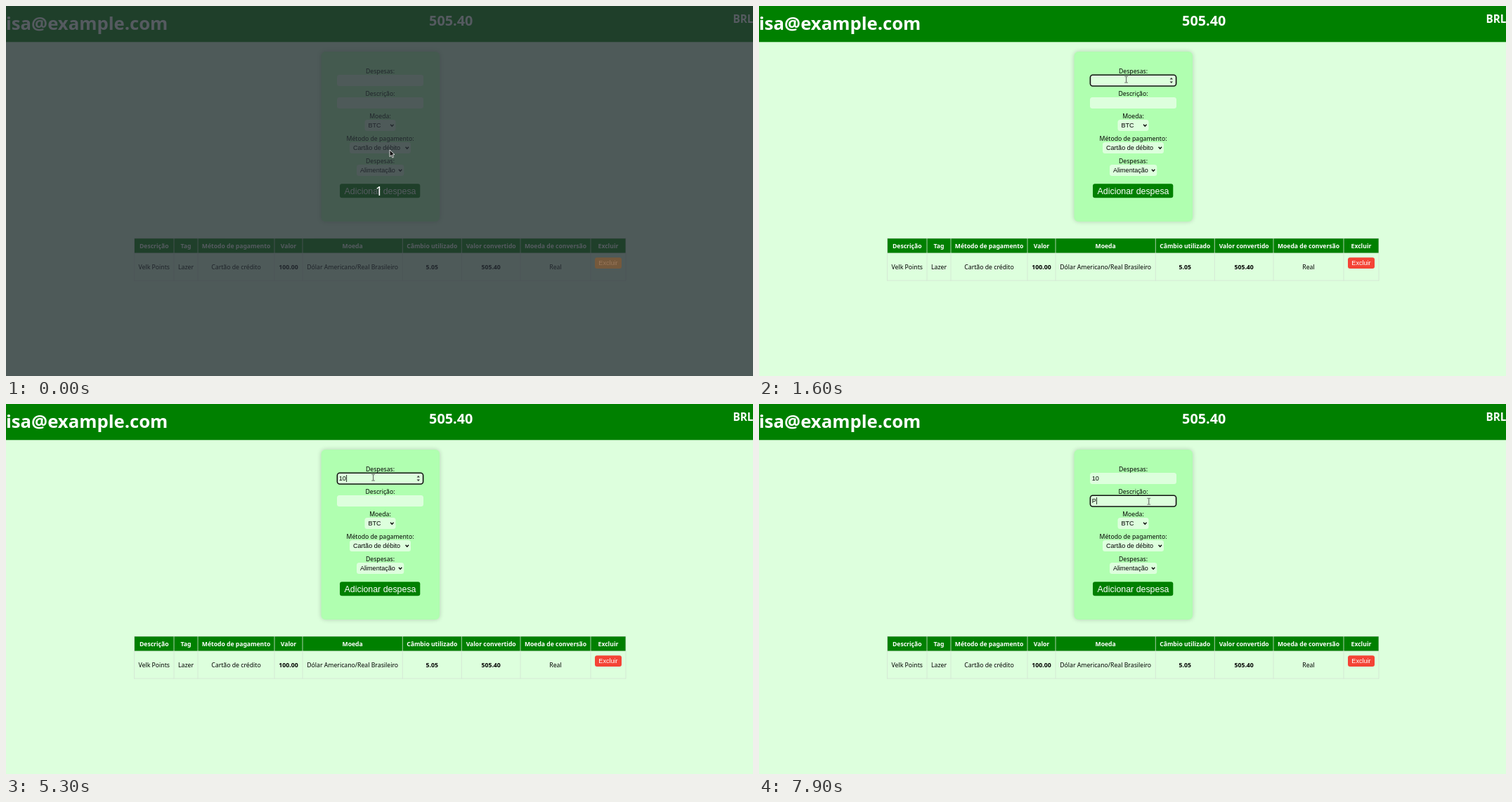
An HTML page with a canvas for the animation above (8000 ms loop, 1063 by 527 pixels).

```html
<!DOCTYPE html>
<html lang="pt-BR">
<head>
<meta charset="utf-8">
<title>Despesas</title>
<style>
  html, body { margin: 0; width: 100%; height: 100%; overflow: hidden; background: #ddffdd; }
  canvas { display: block; }
</style>
</head>
<body>
<canvas id="stage" width="1063" height="527"></canvas>
<script>
const ctx = document.getElementById('stage').getContext('2d');
const W = 1063, H = 527, LOOP = 8000;
const HUMAN = '"Noto Sans", "Open Sans", sans-serif';
const ARIAL = '"Liberation Sans", Arial, sans-serif';
const GREEN = '#008000', PAGE = '#ddffdd', CARD = '#b0ffb0';
const MID = 532.5;

function text(str, x, y, size, { color = '#000', family = HUMAN, weight = 400, align = 'center' } = {}) {
  ctx.font = `${weight} ${size}px ${family}`;
  ctx.fillStyle = color;
  ctx.textAlign = align;
  ctx.fillText(str, x, y);
}

function box(x, y, w, h, r, color) {
  ctx.beginPath();
  ctx.roundRect(x, y, w, h, r);
  ctx.fillStyle = color;
  ctx.fill();
}

function line(points, color, width) {
  ctx.beginPath();
  points.forEach(([x, y]) => ctx.lineTo(x, y));
  ctx.strokeStyle = color;
  ctx.lineWidth = width;
  ctx.stroke();
}

function triangle(x, y, dir) {
  ctx.beginPath();
  ctx.moveTo(x - 2.2, y);
  ctx.lineTo(x + 2.2, y);
  ctx.lineTo(x, y + 2.6 * dir);
  ctx.fillStyle = '#333';
  ctx.fill();
}

function header() {
  const bold = { color: '#fff', weight: 700 };
  ctx.fillStyle = GREEN;
  ctx.fillRect(0, 0, W, 51.3);
  text('isa@example.com', 0, 33.5, 25.7, { ...bold, align: 'left' });
  text('505.40', 633.2, 28, 19.8, bold);
  text('BRL', 1034.5, 24, 15.2, { ...bold, align: 'left' });
}

function select(label, x, y, w) {
  box(x, y, w, 16, 3.5, PAGE);
  text(label, x + 5, y + 11, 9.07, { family: ARIAL, align: 'left' });
  const ax = x + w - 5.2, ay = y + 6.8;
  line([[ax - 2.2, ay], [ax, ay + 2.4], [ax + 2.2, ay]], '#000', 1.3);
}

function input(y, value, focused, caret, spinner) {
  box(471, y, 123, 16, 3.5, PAGE);
  if (focused) {
    ctx.beginPath();
    ctx.roundRect(471.4, y + 0.2, 122.2, 15.8, 3.5);
    ctx.strokeStyle = '#101010';
    ctx.lineWidth = 1.6;
    ctx.stroke();
  }
  text(value, 473.8, y + 11, 9.07, { family: ARIAL, align: 'left' });
  if (caret) {
    const x = 474.2 + ctx.measureText(value).width;
    ctx.fillStyle = '#000';
    ctx.fillRect(x, y + 3, 0.8, 10);
  }
  if (spinner) {
    triangle(586.8, y + 6.6, -1);
    triangle(586.8, y + 9.4, 1);
  }
}

function form(s) {
  ctx.save();
  ctx.shadowColor = 'rgba(0,0,0,.2)';
  ctx.shadowBlur = 6;
  box(448.5, 65, 168.5, 242, 6, CARD);
  ctx.restore();

  ['Despesas:', 'Descrição:', 'Moeda:', 'Método de pagamento:', 'Despesas:']
    .forEach((label, i) => text(label, MID, 96.3 + i * 31.9, 8.69));

  input(98, s.amount, s.focus === 1, s.focus === 1 && s.caret, s.spinner);
  input(130, s.note, s.focus === 2, s.focus === 2 && s.caret, false);
  select('BTC', 510.5, 162, 44);
  select('Cartão de débito', 489, 194, 87);
  select('Alimentação', 499, 226, 67.3);

  box(475, 253.3, 114.3, 20, 3, GREEN);
  text('Adicionar despesa', MID, 267.5, 12.4, { color: '#fff', family: ARIAL });
}

const COLUMNS = [
  ['Descrição', 'Velk Points', 182.5],
  ['Tag', 'Lazer', 239],
  ['Método de pagamento', 'Cartão de crédito', 273],
  ['Valor', '100.00', 382],
  ['Moeda', 'Dólar Americano/Real Brasileiro', 422],
  ['Câmbio utilizado', '5.05', 564.3],
  ['Valor convertido', '505.40', 648.3],
  ['Moeda de conversão', 'Real', 732],
  ['Excluir', '', 832]
];
const RIGHT = 882;

function table() {
  ctx.fillStyle = GREEN;
  ctx.fillRect(182.5, 331, RIGHT - 182.5, 21);
  COLUMNS.forEach(([head, cell, x], i) => {
    const end = i < 8 ? COLUMNS[i + 1][2] : RIGHT;
    const mid = (x + end) / 2;
    text(head, mid, 344.8, 8.6, { color: '#fff', weight: 700 });
    text(cell, mid, 375.2, 8.7, { weight: /^\d/.test(cell) ? 700 : 400 });
    line([[x, 330.5], [x, 391.5]], '#d4e4d4', 0.8);
  });
  line([[RIGHT, 330.5], [RIGHT, 391.5]], '#d4e4d4', 0.8);
  [330.8, 352, 391].forEach(y => line([[182.5, y], [RIGHT, y]], '#d4e4d4', 0.8));
}

function deleteButton(color, label) {
  box(838, 358.3, 38, 15.8, 3, color);
  text('Excluir', 857, 369.3, 9.1, { color: label, family: ARIAL });
}

function arrow(x, y) {
  ctx.beginPath();
  [[0, 0], [0, 9.6], [2.3, 7.5], [3.9, 11], [5.5, 10.3], [3.9, 6.9], [7, 6.7]]
    .forEach(([dx, dy]) => ctx.lineTo(x + dx, y + dy));
  ctx.closePath();
  ctx.fillStyle = '#111';
  ctx.fill();
  ctx.strokeStyle = '#fff';
  ctx.lineWidth = 0.8;
  ctx.stroke();
}

function beam(x, y) {
  line([[x, y - 4.2], [x, y + 4.2]], '#555', 1);
  [-4.4, 4.4].forEach(dy => line([[x - 2.4, y + dy], [x + 2.4, y + dy]], '#666', 0.9));
}

const mix = (a, b, k) => a + (b - a) * k;
const span = (t, a, b) => Math.min(1, Math.max(0, (t - a) / (b - a)));

function pointer(t) {
  if (t < 100) return [546, 205];
  if (t < 1300) {
    const k = 1 - (1 - span(t, 100, 500)) ** 2;
    return [mix(545, 519.8, k), mix(157, 104.7, k)];
  }
  if (t < 5900) return [t < 1500 ? 521 : t < 1600 ? 522 : 522.6, 104.7];
  const k = span(t, 5800, 6500), ease = k * k * (3 - 2 * k);
  return [mix(522.6, 554.8, ease), mix(104.7, 138.7, ease)];
}

const inField = ([x, y]) => x > 471 && x < 594 && (y > 98 && y < 114 || y > 130 && y < 146);

// The caret blinks from the latest click or key press.
function caretOn(t) {
  const start = [7700, 6700, 4100, 3800, 900].find(s => t >= s);
  return start !== undefined && Math.floor((t - start) / 600) % 2 === 0;
}

function draw(now) {
  const t = Math.floor((now % LOOP) / 100) * 100;
  const counting = t < 100;
  const at = pointer(t);
  const focus = t < 900 ? 0 : t < 6700 ? 1 : 2;

  ctx.fillStyle = PAGE;
  ctx.fillRect(0, 0, W, H);
  header();
  form({
    focus,
    caret: caretOn(t),
    amount: t < 3800 ? '' : t < 4100 ? '1' : '10',
    note: t < 7700 ? '' : 'P',
    spinner: focus === 1 || at[1] < 114 && inField(at)
  });
  table();

  if (counting) {
    ctx.fillStyle = 'rgba(40,46,54,.79)';
    ctx.fillRect(0, 0, W, H);
    deleteButton('#75593c', '#98765a');
    text('1', 531, 270.3, 18, { color: '#fff', weight: 500 });
  } else {
    deleteButton('#f44336', '#fff');
  }
  (inField(at) ? beam : arrow)(...at);
}

const began = performance.now();
function tick() {
  draw(performance.now() - began);
  requestAnimationFrame(tick);
}
tick();
</script>
</body>
</html>
```
